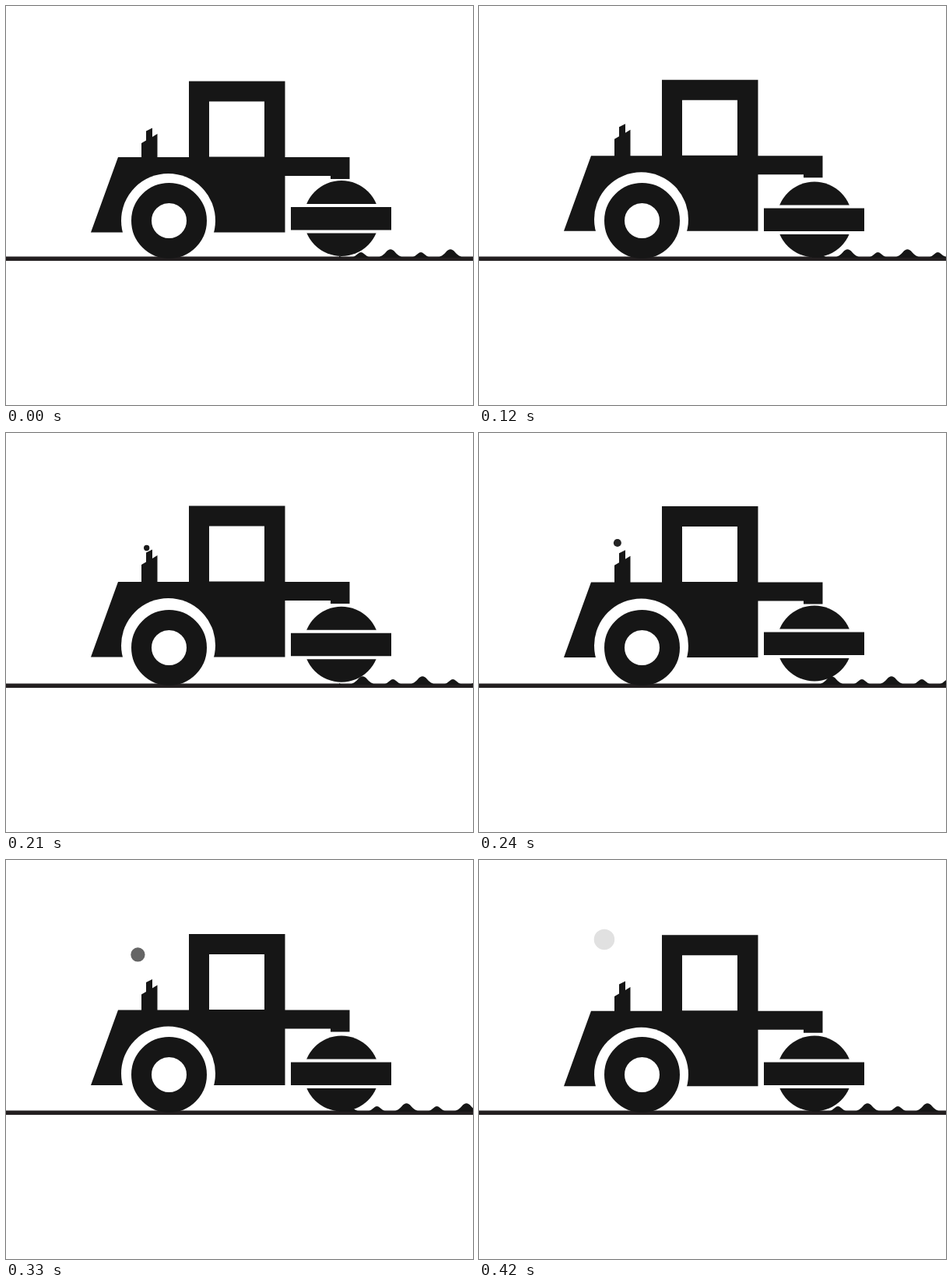
These frames come from a looping animation (600 by 512 pixels, 450 ms). An HTML page:

```html
<!DOCTYPE html>
<html lang="en">
<head>
<meta charset="utf-8">
<title>Road roller</title>
<style>
  html, body { margin: 0; width: 100%; height: 100%; overflow: hidden; background: #fff; }
  svg { display: block; width: 100%; height: 100%; }
</style>
</head>
<body>
<svg viewBox="0 0 600 512" fill="#161616">
  <defs>
    <path id="big" d="M-17 323Q-10 321 -6 316Q0 308.500 6 316Q10 321 17 323Z"/>
    <path id="small" d="M-12 323Q-7 321 -4 318Q0 314 4 318Q7 321 12 323Z"/>
    <clipPath id="ahead"><rect x="428" y="300" width="172" height="30"/></clipPath>
  </defs>

  <circle id="smoke"/>
  <path id="chimney" d="M174 205V176L180 172.500V160.500L188 156.500V168L194.500 164V205Z"/>

  <g id="body">
    <path fill-rule="evenodd" d="M144 194H235V96.500H358.500V194H441.500V222H417V218H358.500V290.500H109Z
      M261 122.500V193.500H332V122.500Z"/>
    <circle cx="208.500" cy="275.500" r="60.500" fill="#fff"/>
  </g>

  <path d="M0 324.300H600" stroke="#231f20" stroke-width="5.500"/>
  <g clip-path="url(#ahead)"><g id="bumps"></g></g>

  <circle cx="209.500" cy="275.500" r="35.500" fill="none" stroke="#161616" stroke-width="26"/>

  <g id="roller">
    <circle cx="431" cy="274" r="48.500"/>
    <path fill="#fff" d="M380 255.500H482V293H380Z"/>
    <path d="M366 259.500H495V289H366Z"/>
  </g>
</svg>

<script>
const LOOP = 450, STEP = 30, SPACING = 77;
const $ = id => document.getElementById(id);
const shift = (id, x, y) => $(id).setAttribute('transform', `translate(${x} ${y})`);

// Linear interpolation through [time, value] pairs
function track(keys, t) {
  const i = Math.max(1, keys.findIndex(k => k[0] >= t));
  const [t0, a] = keys[i - 1], [t1, b] = keys[i];
  return a + (b - a) * (t - t0) / (t1 - t0);
}

const bodyLift = [[0, 0], [210, -3], [450, 0]];
const chimneyLift = [[0, 0], [180, -8], [450, 0]];
const rollerLift = [[0, -1.5], [30, -2], [60, -1], [90, 0], [120, 0], [180, -1.5],
  [240, -4], [300, -1], [330, 0], [420, 0], [450, -1.5]];

let bumps = '';
for (let x = 417; x < 700; x += SPACING)
  bumps += `<use href="#big" x="${x}"/><use href="#small" x="${x + 39}"/>`;
$('bumps').innerHTML = bumps;

function drawSmoke(t) {
  const age = Math.max(0, t - 180);
  const attrs = {
    cx: 183.5 - age * 0.094,
    cy: 154 - age * 0.217,
    r: age && 2.3 + age * 0.0455,
    opacity: 1 - 1.1 * (age / 270) ** 2
  };
  for (const name in attrs) $('smoke').setAttribute(name, attrs[name]);
}

function draw(now) {
  const t = Math.floor(now % LOOP / STEP) * STEP;
  shift('body', 0, track(bodyLift, t));
  shift('chimney', 0, track(chimneyLift, t));
  shift('roller', 0, track(rollerLift, t));
  shift('bumps', -SPACING * t / LOOP, 0);
  drawSmoke(t);
  requestAnimationFrame(draw);
}
draw(performance.now());
</script>
</body>
</html>
```
